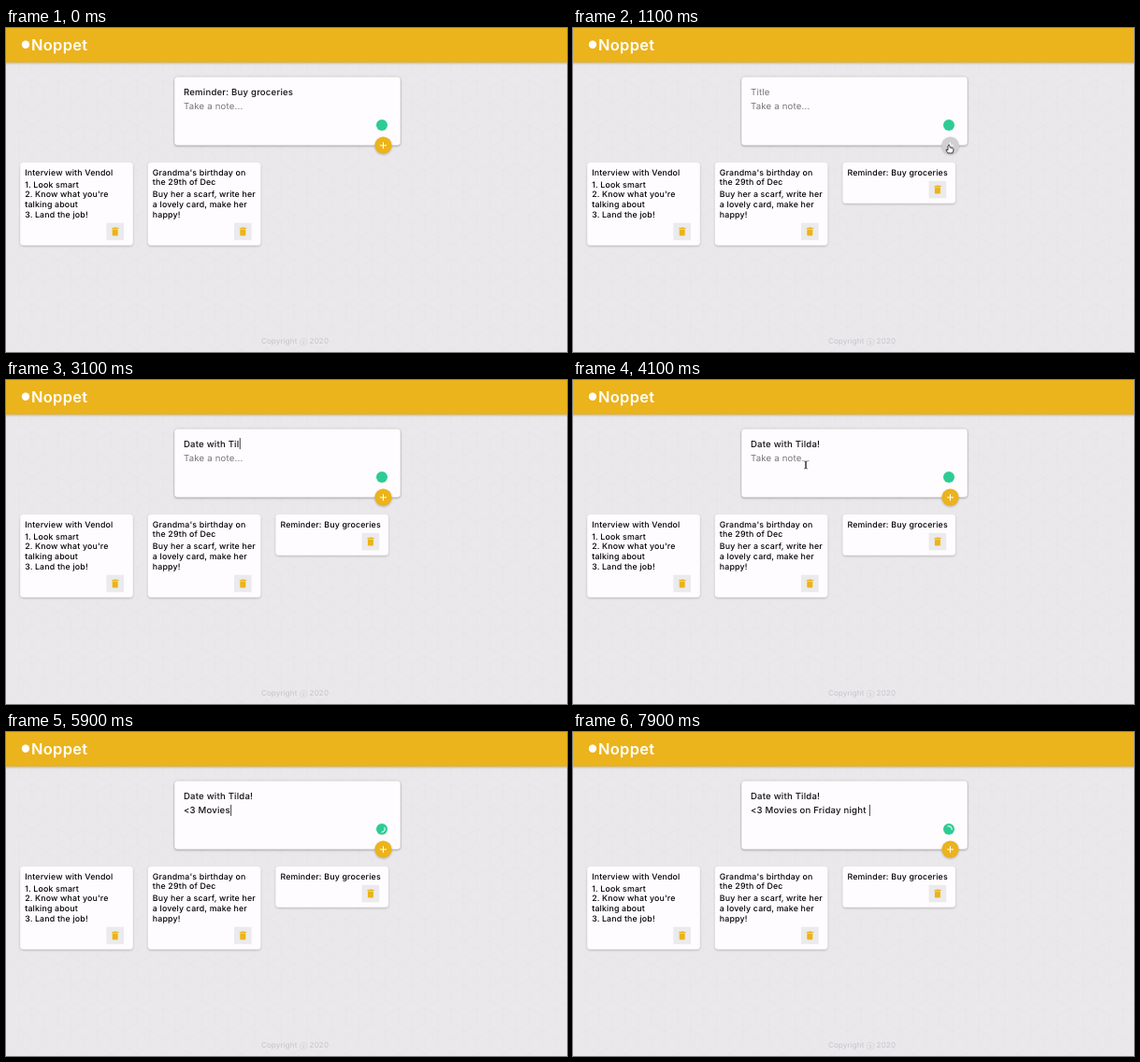
Recreate the animation shown at these times as an HTML page. Size 600 px wide and 347 px high, loop 8 s.

```html
<!DOCTYPE html>
<html lang="en">
<head>
<meta charset="utf-8">
<title>Notes</title>
<style>
html, body { margin: 0; width: 100%; height: 100%; overflow: hidden; }
svg { display: block; width: 600px; height: 347px; font-family: Inter, "Open Sans", sans-serif; }
text { white-space: pre; letter-spacing: .02em; text-rendering: geometricPrecision; }
.card { fill: #fefcfe; }
.small { font-size: 8.8px; font-weight: 500; }
.field { font-size: 9.6px; font-weight: 500; fill: #111; }
.hint { font-weight: 400; fill: #757575; }
.add { fill: #ebb31b; }
.add.over { fill: #d0cfd1; }
</style>
</head>
<body>
<svg viewBox="0 0 600 347">
  <defs>
    <pattern id="cubes" width="28" height="48" patternUnits="userSpaceOnUse">
      <path d="M0 8 14 0 28 8 14 16ZM0 8V24L14 32 28 24V8M14 16V48M0 40 14 32 28 40M0 40V48M28 40V48"
        fill="none" stroke="#e6e4e7" stroke-width=".7"/>
    </pattern>
    <filter id="shade" x="-20%" y="-20%" width="140%" height="150%">
      <feDropShadow dx="0" dy="1" stdDeviation="1.1" flood-color="#888" flood-opacity=".55"/>
    </filter>
    <filter id="deep" x="-10%" y="-10%" width="120%" height="130%">
      <feDropShadow dx="0" dy=".6" stdDeviation="1.2" flood-color="#555" flood-opacity=".75"/>
    </filter>
    <path id="bar" d="M-1.7-4Q0-4 0-3V3Q0 4-1.7 4M1.7-4Q0-4 0-3V3Q0 4 1.7 4" fill="none"/>
    <g id="bin">
      <rect width="18.6" height="18.6" fill="#ebeaec"/>
      <path d="M5.8 5.2h2l.5-.5h2.500l.5.5h2v1h-7.500zM6.300 6.700h6v6q0 1-1 1h-4q-1 0-1-1z" fill="#ebb31b"/>
    </g>
  </defs>
  <rect width="600" height="347" fill="#eae8eb"/>
  <rect width="600" height="347" fill="url(#cubes)"/>
  <rect x="-10" y="-10" width="620" height="47" fill="#ebb31b" filter="url(#shade)"/>
  <circle cx="21" cy="17.7" r="4.2" fill="#fff"/>
  <text x="27" y="24.3" font-size="16.4" font-weight="600" fill="#fff">Noppet</text>

  <rect class="card" x="180.3" y="52.5" width="241.4" height="73" rx="3.5" filter="url(#deep)"/>
  <text id="title" x="190" y="71.6"/>
  <text id="note" x="190" y="87.4"/>
  <rect id="caret" width=".8" height="12" fill="#111"/>
  <circle cx="402" cy="104" r="6" fill="#2fcb94"/>
  <path id="spinner" d="M399.2 102.4A3.3 3.3 0 0 1 404.8 102.4" fill="none" stroke="#fff" stroke-linecap="round"/>
  <circle id="add" cx="403.5" cy="125.8" r="9.2" filter="url(#shade)"/>
  <path d="M400 125.8h7m-3.5-3.5v7" stroke="#fff"/>

  <g id="cards"></g>
  <text x="309" y="337.5" font-size="8" text-anchor="middle" fill="#c6c4c8">Copyright ⓒ 2020</text>

  <g id="cursor" stroke="#111" stroke-width=".8" stroke-linejoin="round">
    <path id="arrow" d="M0 0V9.5L2 7.5 4 11 5 10 4 7H7Z" fill="#111" stroke="#fff"/>
    <path id="hand" d="M-1 1Q0-1 1 1V3Q5 3 5 5T4 9H-1L-3 6Q-3 4-1 6Z" fill="#fff"/>
    <g id="beam">
      <use href="#bar" stroke="#fff" stroke-width="1.8"/>
      <use href="#bar"/>
    </g>
  </g>
</svg>
<script>
const LOOP = 8000, SAVED = 1000, BLINK = 500, GLIDE = 250, LINE = 10.6;
const $ = id => document.getElementById(id);
const show = (id, on) => $(id).style.display = on ? '' : 'none';

const lines = (rows, x, y) => rows.map((row, i) =>
  `<text class="small" x="${x}" y="${y + i * LINE}">${row}</text>`).join('');

function card({ title, body = [] }, column) {
  const x = 15.2 + column * 136.6, gap = body.length ? 2.5 : 0;
  const height = 33.2 + (title.length + body.length) * LINE + gap;
  return `<g id="card${column}">
    <rect class="card" x="${x}" y="144" width="120.6" height="${height}" rx="3.5" filter="url(#shade)"/>
    ${lines(title, x + 5, 157.6)}${lines(body, x + 5, 157.6 + gap + title.length * LINE)}
    <use href="#bin" x="${x + 92.2}" y="${120 + height}"/></g>`;
}

$('cards').innerHTML = [
  { title: ['Interview with Vendol'],
    body: ['1. Look smart', "2. Know what you're", 'talking about', '3. Land the job!'] },
  { title: ["Grandma's birthday on", 'the 29th of Dec'],
    body: ['Buy her a scarf, write her', 'a lovely card, make her', 'happy!'] },
  { title: ['Reminder: Buy groceries'] }
].map(card).join('');

// Bursts of typing: start, ms per letter, letters
const fields = {
  title: { hint: 'Title', click: 1300,
    bursts: [[2000, 100, 'Date '], [2700, 55, 'with Tilda'], [3400, 0, '!']] },
  note: { hint: 'Take a note...', click: 4300,
    bursts: [[4500, 90, '<3'], [5150, 110, ' Movies on '], [6800, 75, 'Friday night ']] }
};

function type(id, t) {
  const { hint, click, bursts } = fields[id];
  let value = '', last = click;
  for (const [start, step, letters] of bursts)
    [...letters].forEach((letter, i) => {
      const at = start + i * step;
      if (at <= t) { value += letter; last = at; }
    });
  if (id === 'title' && t < SAVED) value = 'Reminder: Buy groceries';
  $(id).textContent = value || hint;
  $(id).setAttribute('class', value ? 'field' : 'field hint');
  return { id, value, last, active: t >= click };
}

function drawCaret({ id, value, last, active }, t) {
  show('caret', active && (t - last) % (2 * BLINK) < BLINK);
  $('caret').setAttribute('x', 190.5 + (value ? $(id).getComputedTextLength() : 0));
  $('caret').setAttribute('y', $(id).getAttribute('y') - 9.5);
}

// Each glide: start time and destination
const glides = [[400, 402, 125], [1100, 254, 68], [3600, 249, 91]];

function pointer(t) {
  let x = 290, y = 306;
  for (const [start, toX, toY] of glides) {
    const u = Math.min(1, Math.max(0, (t - start) / GLIDE)), ease = u * u * (3 - 2 * u);
    x += (toX - x) * ease;
    y += (toY - y) * ease;
  }
  return [x, y];
}

function drawCursor(t) {
  const [x, y] = pointer(t);
  const seen = (t >= 100 && t < 2000) || (t >= 3600 && t < 4500);
  const over = Math.hypot(x - 403.5, y - 125.8) < 9.2;
  const inForm = !over && x > 190 && x < 412 && y > 60 && y < 118;
  show('cursor', seen);
  show('hand', over);
  show('beam', inForm);
  show('arrow', !inForm && !over);
  $('cursor').setAttribute('transform', `translate(${x} ${y})`);
  $('add').setAttribute('class', over && seen ? 'add over' : 'add');
}

function draw(t) {
  const title = type('title', t), note = type('note', t);
  drawCaret(note.active ? note : title, t);
  show('card2', t >= SAVED);
  show('spinner', t >= 4500);
  $('spinner').setAttribute('transform', `rotate(${(t - 4400) * .32} 402 104)`);
  drawCursor(t);
}

function tick() {
  draw(performance.now() % LOOP);
  requestAnimationFrame(tick);
}
tick();
</script>
</body>
</html>
```
